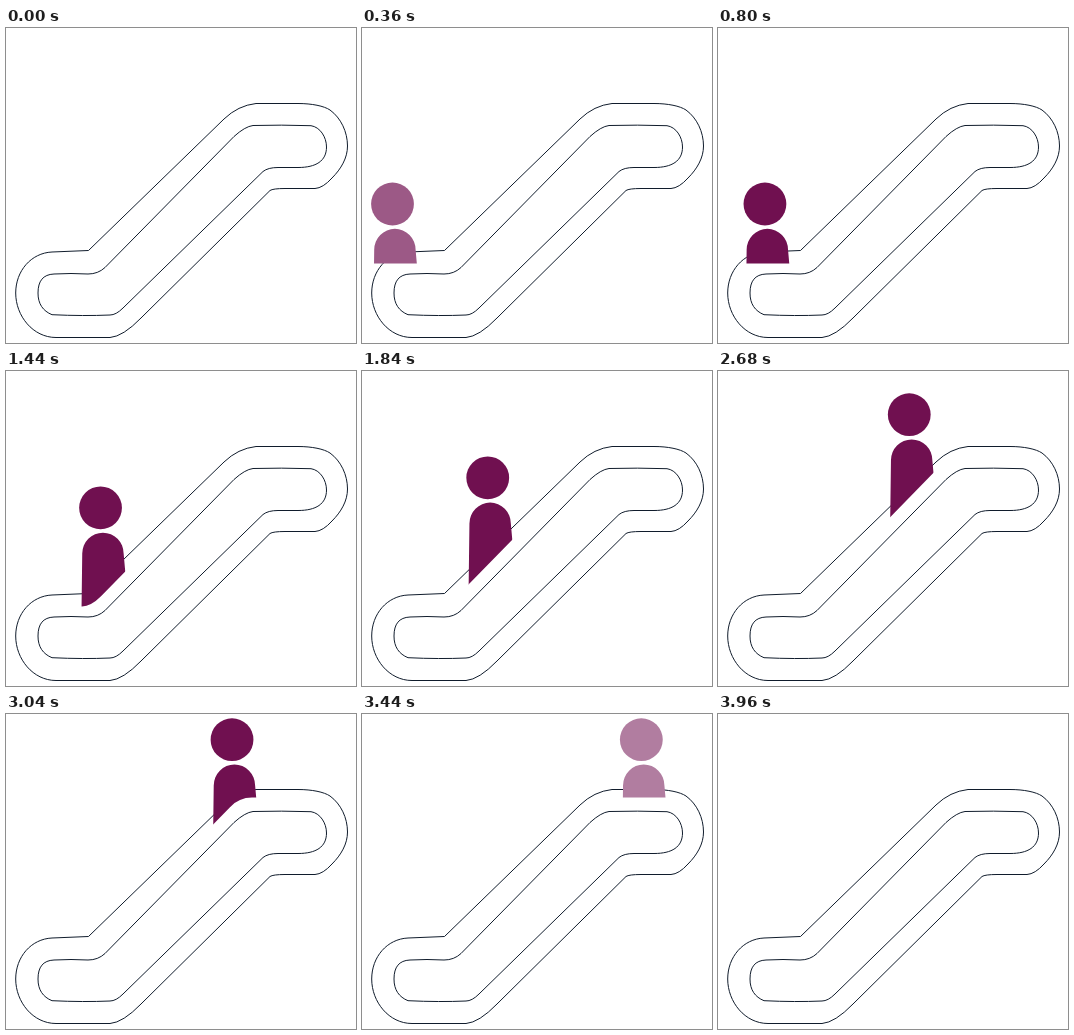
An HTML page for the animation above (4000 ms loop, 350 by 315 pixels).

```html
<!DOCTYPE html>
<html lang="en">
<head>
<meta charset="utf-8">
<title>Escalator</title>
<style>
  html, body { margin: 0; width: 100%; height: 100%; overflow: hidden; background: #fff; }
  svg { display: block; width: 350px; height: 315px; }
</style>
</head>
<body>
<svg viewBox="0 0 350 315">
  <defs>
    <!-- Everything above the centre line of the moving belt -->
    <clipPath id="aboveBelt">
      <path d="M-20 -20V235.4H76Q85 235.4 95 225.3L224 93.2Q233 83.6 246 83.6H370V-20Z"/>
    </clipPath>
  </defs>
  <g fill="none" stroke="#101c2c">
    <path d="M46 224L82.500 222.500L218 91Q232 77.500 250 75.500H292C306 75.500 318 78 324 82C335 90 341.500 104 341.500 118C341.500 130 335 141 326 150Q317 160 309 160.500H279Q267 160.500 264 162.500L135 290Q117 308.500 104 309.500H50C27 309.500 9.700 288 9.700 265C9.700 243 25 225 46 224Z"/>
    <path d="M48 246Q65 245 82 246Q92 246 99 239.500L228 108.500Q239 98.500 247 97.500Q275 96.700 305 97.700C314 99 320.500 109 320.500 119C320.500 133 310 139.500 292 139.500H272Q262 139.500 257 143.500L117 280Q110 287 104 287Q78 288.200 46 286.700C37 283 32 276 32 265C32 253 37 246.500 48 246Z"/>
  </g>
  <g id="rider" clip-path="url(#aboveBelt)">
    <g id="figure">
      <circle cx="21.500" cy="21.300" r="21.400"/>
      <path d="M2.400 130L3.200 67A20.700 20.900 0 0 1 44.600 67L46.200 85V130Z"/>
    </g>
  </g>
</svg>
<script>
  const LOOP = 4000;
  const PLUM = [112, 16, 80];
  const rider = document.getElementById("rider");
  const figure = document.getElementById("figure");

  // Piecewise linear keyframes: [time, value]
  const xKeys = [[0, 9], [520, 9], [920, 32.4], [2920, 188.4], [3720, 295]];
  const yKeys = [[920, 154.7], [2920, 4.4]];
  const strengthKeys = [[0, 0], [520, 1], [3040, 1], [3920, 0]];

  function valueAt(keys, t) {
    if (t <= keys[0][0]) return keys[0][1];
    for (let i = 1; i < keys.length; i++) {
      const [t0, v0] = keys[i - 1];
      const [t1, v1] = keys[i];
      if (t < t1) return v0 + (v1 - v0) * (t - t0) / (t1 - t0);
    }
    return keys[keys.length - 1][1];
  }

  function draw() {
    const t = performance.now() % LOOP;
    const strength = valueAt(strengthKeys, t);
    // The rider pales towards white but still covers the belt behind it.
    const color = PLUM.map(c => Math.round(255 + (c - 255) * strength));
    figure.setAttribute("transform", `translate(${valueAt(xKeys, t)} ${valueAt(yKeys, t)})`);
    rider.setAttribute("fill", `rgb(${color})`);
    rider.setAttribute("visibility", strength > 0.02 ? "visible" : "hidden");
    requestAnimationFrame(draw);
  }
  draw();
</script>
</body>
</html>
```
